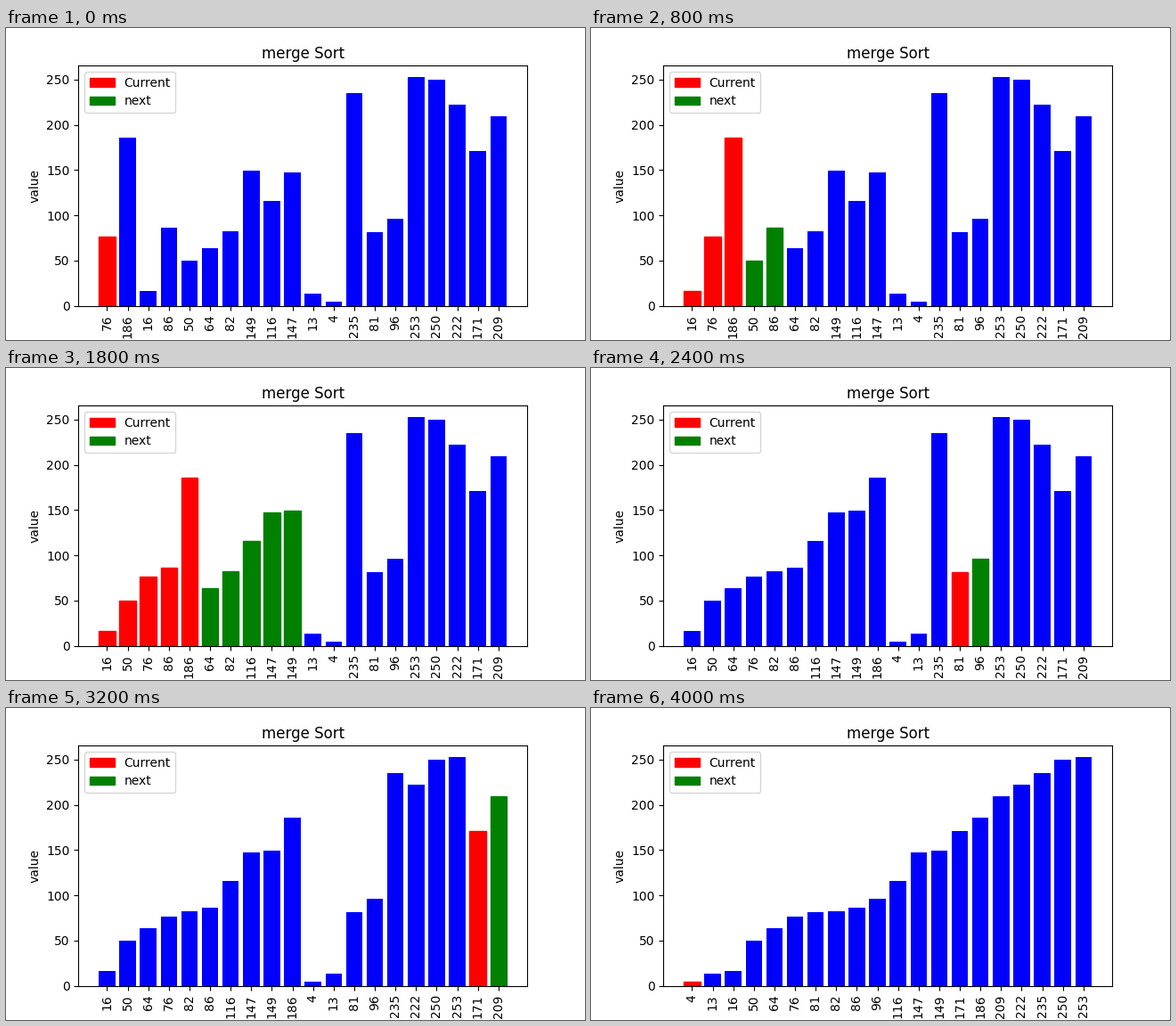
These frames come from a looping animation (650x350 px, 5 s). A matplotlib script:

```python
import matplotlib.pyplot as plt
from matplotlib.animation import FuncAnimation
from matplotlib.patches import Patch

VALUES = [76, 186, 16, 86, 50, 64, 82, 149, 116, 147,
          13, 4, 235, 81, 96, 253, 250, 222, 171, 209]
STEP_MS = 200
HOLD = 5  # how many steps the sorted result stays


def merge_sort(data, lo, hi):
    """Sort data[lo:hi + 1] in place, yielding each pair of runs before its merge."""
    if lo >= hi:
        return
    mid = (lo + hi) // 2
    yield from merge_sort(data, lo, mid)
    yield from merge_sort(data, mid + 1, hi)
    yield data[:], range(lo, mid + 1), range(mid + 1, hi + 1)
    data[lo:hi + 1] = sorted(data[lo:hi + 1])


def build_states():
    data = VALUES[:]
    states = [(VALUES[:], range(1), range(0))]
    states += merge_sort(data, 0, len(data) - 1)
    states += [(data, range(1), range(0))] * HOLD
    return states


states = build_states()

plt.rcParams["font.family"] = "DejaVu Sans"
fig, ax = plt.subplots(figsize=(6.5, 3.5), dpi=100)
slots = range(len(VALUES))
bars = ax.bar(slots, VALUES, color="blue")
ax.set_xticks(slots)
ax.set_title("merge Sort")
ax.set_ylabel("value")
ax.legend(handles=[Patch(color="red", label="Current"),
                   Patch(color="green", label="next")], loc="upper left")


def draw(i):
    data, current, following = states[i]
    for k, bar in enumerate(bars):
        bar.set_height(data[k])
        if k in current:
            bar.set_color("red")
        elif k in following:
            bar.set_color("green")
        else:
            bar.set_facecolor("blue")
            bar.set_edgecolor("none")
    ax.set_xticklabels(data, rotation=90)
    return bars.patches


anim = FuncAnimation(fig, draw, frames=len(states), init_func=lambda: draw(0),
                     interval=STEP_MS, repeat=True, repeat_delay=0)
plt.show()
```
